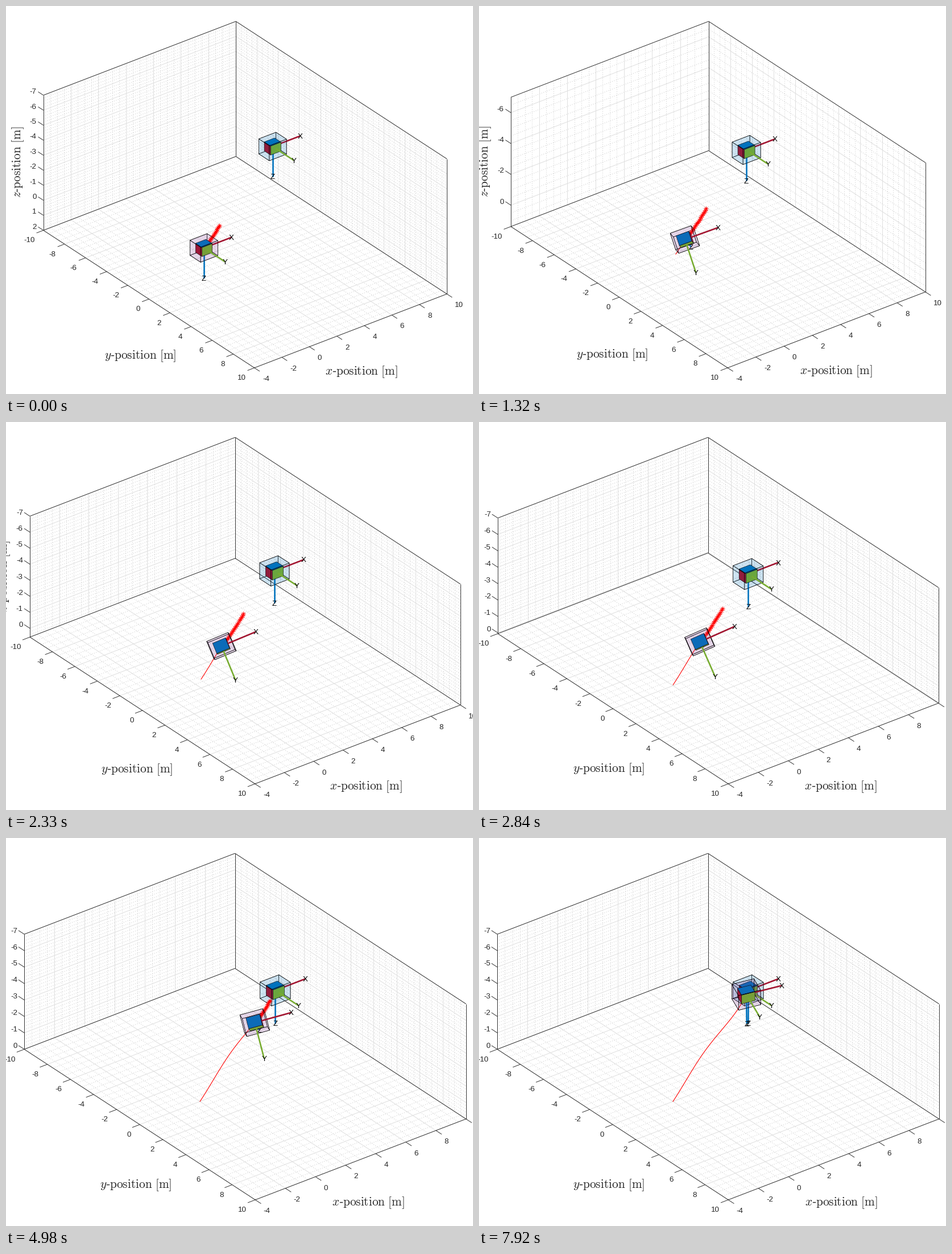
Recreate the animation shown at these times as a matplotlib script. Size 821 by 682 pixels, loop 8 s.

```python
import itertools

import matplotlib.pyplot as plt
import numpy as np
from matplotlib.animation import FuncAnimation
from matplotlib.collections import LineCollection, PolyCollection

W, H, DPI = 821, 682, 100
FRAMES, INTERVAL = 80, 100
PX = 72 / DPI

plt.rcParams["font.family"] = "Liberation Sans"
plt.rcParams["mathtext.fontset"] = "cm"

# Orthographic view: azimuth -37.5, elevation 30, z pointing down
AZ, EL = np.radians(37.5), np.radians(30)
RIGHT = np.array([np.cos(AZ), np.sin(AZ), 0])
DOWN = np.array([-np.sin(AZ) * np.sin(EL), np.cos(AZ) * np.sin(EL), np.cos(EL)])
SCREEN = np.array([RIGHT, DOWN])
TOWARD = -np.cross(RIGHT, DOWN)

X0, X1, Y0, Y1, Z0 = -4, 10, -10, 10, -7
CENTRE = np.array([420.4, 331.5])
PLOT_H = 609

INK = "#262626"
AXIS_COLORS = ["#a2142f", "#77ac30", "#0072bd"]
SIZE = np.array([1.25, 1, 1])
GOAL = np.array([5, 0, -5])


def smooth(t):
    t = np.clip(t, 0, 1)
    return t * t * (3 - 2 * t)


def z_limit(i):
    return 2 * max(0, 1 - (i / 28.5) ** 1.5)


def travelled():
    """Share of the way covered at each frame: speed up, cruise, slow down."""
    t = np.linspace(0, FRAMES, FRAMES * 20 + 1)
    speed = 0.0165 * np.clip(t / 9, 0, 1) * (1 - 0.75 * np.clip((t - 36) / 43, 0, 1))
    steps = (speed[1:] + speed[:-1]) / 2 * np.diff(t)
    return np.concatenate([[0], np.cumsum(steps)])[::20]


SHARE = travelled()


def offset(share):
    """Screen offset from the start in scene units, swaying about the straight line."""
    sway = -0.032 * np.sin(2 * np.pi * share ** 1.5)
    return SCREEN @ GOAL * [share + sway, share]


def look_ahead(i):
    """Length of the predicted path as a share of the whole way."""
    return (0.222 + 0.078 * smooth(i / 10)) * (1 - smooth((i - 38) / 28))


def attitude(i):
    """Rotation matrix of the moving body: tilt over, hold, level out."""
    level_out = 1 - 0.83 * smooth((i - 40) / 38)
    roll = 47 * smooth(i / 18) * level_out
    pitch = 31 * smooth(i / 13) * level_out
    yaw = smooth(i / 10) * (21 - 7 * np.sin(2 * np.pi * (i - 15) / 58))
    vec = np.radians([roll, pitch, yaw])
    angle = np.linalg.norm(vec)
    a, b, c = vec / max(angle, 1e-9)
    k = np.array([[0, -c, b], [c, 0, -a], [-b, a, 0]])
    return np.eye(3) + np.sin(angle) * k + (1 - np.cos(angle)) * k @ k


def ticks(lo, hi, step):
    first, last = np.ceil(lo / step - 1e-6), np.floor(hi / step + 1e-6)
    return np.arange(first, last + 1) * step


def between(lo, hi, step, major):
    t = ticks(lo, hi, step)
    return t[[np.abs(major - v).min() > 1e-6 for v in t]]


fig = plt.figure(figsize=(W / DPI, H / DPI), dpi=DPI, facecolor="white")
ax = fig.add_axes([0, 0, 1, 1])


class View:
    def __init__(self, zmax):
        self.zmax = zmax
        self.scale = PLOT_H / (DOWN @ [X0 - X1, Y1 - Y0, zmax - Z0])
        self.mid = np.array([(X0 + X1) / 2, (Y0 + Y1) / 2, (Z0 + zmax) / 2])

    def __call__(self, *p):
        return CENTRE + self.scale * (SCREEN @ (np.array(p, float) - self.mid))


def lines(segments, color, width, order, **kw):
    ax.add_collection(LineCollection(segments, colors=color, linewidths=width * PX,
                                     zorder=order, **kw))


def polygons(quads, fill, width, order):
    ax.add_collection(PolyCollection(quads, facecolors=fill, edgecolors="black",
                                     linewidths=width * PX, zorder=order))


def label(x, y, text, size=13.33, color=INK, order=1, **kw):
    kw = {"ha": "center", "va": "center_baseline", **kw}
    ax.text(x, y, text, fontsize=size * PX, color=color, zorder=order, **kw)


def grid(view, xs, ys, zs):
    zm = view.zmax
    seg = []
    for x in xs:
        seg.append([view(x, Y0, zm), view(x, Y1, zm)])
        seg.append([view(x, Y0, zm), view(x, Y0, Z0)])
    for y in ys:
        seg.append([view(X0, y, zm), view(X1, y, zm)])
        seg.append([view(X1, y, zm), view(X1, y, Z0)])
    for z in zs:
        seg.append([view(X0, Y0, z), view(X1, Y0, z)])
        seg.append([view(X1, Y0, z), view(X1, Y1, z)])
    return seg


def scene(view):
    zm = view.zmax
    zstep, zminor = (2, 0.5) if 1 < zm < 2 else (1, 0.2)
    xs, ys, zs = ticks(X0, X1, 2), ticks(Y0, Y1, 2), ticks(Z0, zm, zstep)

    minor = grid(view, between(X0, X1, 0.5, xs), between(Y0, Y1, 0.5, ys),
                 between(Z0, zm, zminor, zs))
    lines(minor, "#c8c8c8", 1, 0, linestyles=(0, (1, 2.6)))
    lines(grid(view, xs, ys, zs), "#dfdfdf", 1, 0.1)

    corners = [(X0, Y1), (X1, Y1), (X1, Y0), (X0, Y0)]
    low = [view(x, y, zm) for x, y in corners]
    high = [view(x, y, Z0) for x, y in corners]
    edges = [[low[i], low[(i + 1) % 4]] for i in range(4)]
    edges += [[low[i], high[i]] for i in (1, 2, 3)]
    edges += [[high[1], high[2]], [high[2], high[3]]]

    def tick(start, end, value, dx, dy, ha):
        p = view(*start)
        edges.append([p, view(*end)])
        label(p[0] + dx, p[1] + dy, f"{value + 0:.0f}", ha=ha)

    for x in xs:
        tick((x, Y1, zm), (x, Y1 + 0.5, zm), x, 14.3, 18.7, "left")
    for y in ys:
        tick((X0, y, zm), (X0 - 0.5, y, zm), y, -15.2, 16.7, "right")
    for z in zs:
        tick((X0, Y0, z), (X0, Y0 - 0.5, z), z, -12.2, -7, "right")
    lines(edges, INK, 0.9, 0.2)

    grow = view.scale - 30.47
    title = r"${}\mathrm{{" + "\u2010" + r"position\ [m]}}$"
    zx, zy = (low[3] + high[3]) / 2
    for name, x, y, turn in [("x", 625 + 4 * grow, 643 - 0.7 * grow, 0),
                             ("y", 236 - 2.8 * grow, 615 - 1.7 * grow, 0),
                             ("z", zx - 45, zy - 1, 90)]:
        label(x, y, title.format(name), 21.3, va="center", rotation=turn)


def faces(size, facing, front):
    """Corner lists and axis numbers of the box sides that do or don't face us."""
    for axis, sign in itertools.product(range(3), (-1, 1)):
        if (facing[axis] * sign > 0) != front:
            continue
        a, b = [k for k in range(3) if k != axis]
        quad = np.zeros((4, 3))
        quad[:, axis] = sign
        quad[:, a] = [-1, 1, 1, -1]
        quad[:, b] = [-1, -1, 1, 1]
        yield axis, quad * size / 2


def body(centre, rot, scale, tint, order):
    facing = TOWARD @ rot
    flat = scale * (SCREEN @ rot).T

    def place(p):
        return centre + p @ flat

    def shell(front, z):
        quads = [place(q) for _, q in faces(SIZE, facing, front)]
        polygons(quads, [(*tint, 0.1)], 0.55, z)

    shell(False, order)
    inner = list(faces(SIZE * 0.6, facing, True))
    polygons([place(q) for _, q in inner], [AXIS_COLORS[k] for k, _ in inner],
             0.6, order + 0.4)
    shell(True, order + 0.5)
    for k, name in enumerate("XYZ"):
        z = order + (0.6 if facing[k] > 0 else 0.1)
        unit = np.eye(3)[k]
        tip = place(2 * unit)
        lines([[place(unit * SIZE[k] * 0.3), tip]], AXIS_COLORS[k], 2.6, z)
        label(*tip, name, color="black", order=z + 0.05)


def prediction(start, along, order):
    q = np.linspace(0, 1, 20)[:, None]
    side = np.array([-along[1], along[0]]) / (np.linalg.norm(along) + 1e-9)
    pts = start + along * q + side * 6 * q * (1 - q)
    ax.plot(*pts.T, ls="none", marker=(8, 2, 0), ms=8 * PX, mew=0.5 * PX,
            color="red", zorder=order)


def draw(i):
    ax.clear()
    ax.set_xlim(0, W)
    ax.set_ylim(H, 0)
    ax.axis("off")

    view = View(z_limit(i))
    scene(view)
    body(view(*GOAL), np.eye(3), view.scale, (0, 0.447, 0.741), 2)

    origin = view(0, 0, 0)
    trail = np.array([origin + view.scale * offset(s) for s in SHARE[:i + 1]])
    ax.plot(*trail.T, color="red", lw=1.1 * PX, zorder=2.9)
    prediction(trail[-1], view.scale * look_ahead(i) * (SCREEN @ GOAL), 3.3)
    body(trail[-1], attitude(i), view.scale, (0.494, 0.184, 0.556), 3)
    return []


anim = FuncAnimation(fig, draw, frames=FRAMES, interval=INTERVAL,
                     init_func=lambda: draw(0), repeat=True, repeat_delay=0)
plt.show()
```
